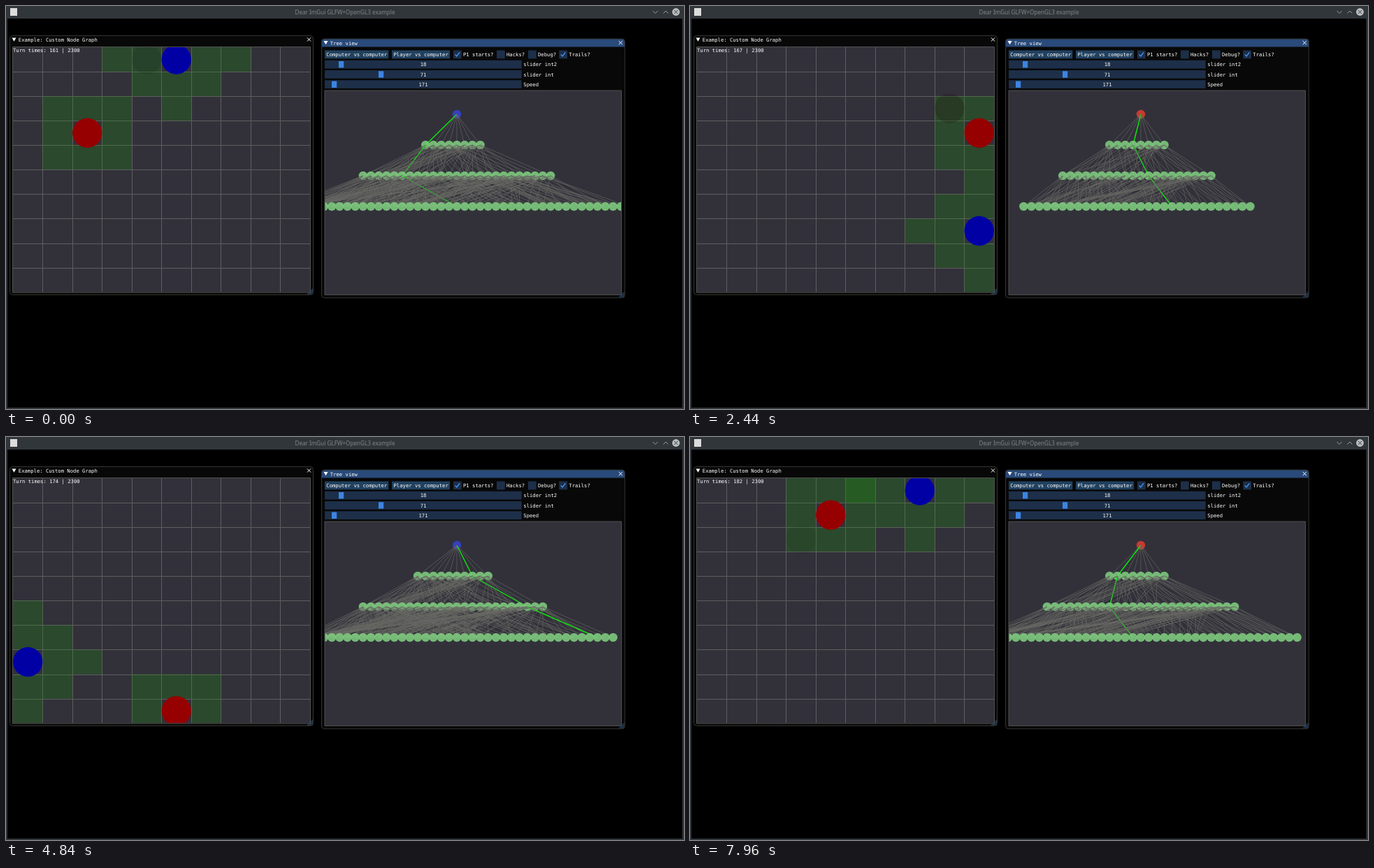
Recreate the animation shown at these times as an HTML page with a canvas. Size 970 by 577 pixels, loop 8 s.

```html
<!DOCTYPE html>
<html lang="en">
<head>
<meta charset="utf-8">
<title>Node graph</title>
<style>
html, body { margin: 0; width: 100%; height: 100%; overflow: hidden; background: #000; }
canvas { display: block; }
</style>
</head>
<body>
<canvas id="stage" width="970" height="577"></canvas>
<script>
const ctx = document.getElementById('stage').getContext('2d');
const LOOP = 8000, STEP = 40, SIZE = 10, LAP = 20;
const MONO = '7.22px "DejaVu Sans Mono", monospace';
const BOARD = { x: 10, y: 59, w: 425, h: 350.7 };
const TREE = { x: 456, y: 121, w: 424.5, h: 292.5 };
const CELL_W = BOARD.w / SIZE, CELL_H = BOARD.h / SIZE;
const ROW_H = 11.8, ROW_PITCH = 14.27, ROW_TOP = 63.5;
const PANEL = '#32313a', FRAME = '#1d2f49', EDGE = '#5e5e5e';

// Clockwise from north, then the straight double steps.
const KING = [[0, -1], [1, -1], [1, 0], [1, 1], [0, 1], [-1, 1], [-1, 0], [-1, -1]];
const DIAMOND = [...KING, [0, -2], [2, 0], [0, 2], [-2, 0]];

// One side of the blue lap; the other three are quarter turns of it.
const BLUE_SIDE = [[5, 0], [7, 0], [8, 1], [9, 2], [9, 4]];
const RED_LAP = [[2, 3], [3, 2], [4, 1], [5, 0], [6, 0], [7, 1], [8, 2], [9, 3], [9, 4], [9, 5],
  [8, 6], [7, 7], [6, 8], [5, 9], [4, 9], [3, 8], [2, 7], [1, 6], [1, 5], [1, 4]];

// Time in ms against turns played.
const PACE = [[0, 0.45], [1120, 3.32], [2440, 6.9], [3600, 10.06], [4840, 13.49], [5800, 16.06], [7960, 21.98]];

const wrap = n => ((n % LAP) + LAP) % LAP;
const turn90 = ([x, y]) => [9 - y, x];
const onBoard = ([x, y]) => x >= 0 && y >= 0 && x < SIZE && y < SIZE;
const repeatStep = ([ax, ay], [bx, by]) => [2 * bx - ax, 2 * by - ay];

function blueAt(n) {
  n = wrap(n);
  let p = BLUE_SIDE[n % 5];
  for (let q = Math.floor(n / 5); q > 0; q--) p = turn90(p);
  return p;
}
const redAt = n => RED_LAP[wrap(n)];

// Blue plans to run straight on, into the corner if need be.
function bluePlan(n) {
  const from = blueAt(n - 1), to = blueAt(n);
  const cornerNext = wrap(n + 1) % 5 === 2;
  const second = cornerNext ? repeatStep(from, to) : blueAt(n + 1);
  const third = repeatStep(to, second);
  const plan = [from, to, second];
  if (onBoard(third)) plan.push(third);
  else if (!cornerNext) plan.push(blueAt(n + 2));
  return plan;
}
const redPlan = n => [-1, 0, 1, 2].map(i => redAt(n + i));

const BLUE = { moves: DIAMOND, at: blueAt, plan: bluePlan, rgb: [0, 0, 165], root: '#3440bc' };
const RED = { moves: KING, at: redAt, plan: redPlan, rgb: [150, 0, 0], root: '#c83a30' };

function turnsAt(t) {
  let i = 1;
  while (i < PACE.length - 1 && t > PACE[i][0]) i++;
  const [t0, u0] = PACE[i - 1], [t1, u1] = PACE[i];
  return u0 + (u1 - u0) * (t - t0) / (t1 - t0);
}

const key = ([x, y]) => y * SIZE + x;
const reach = ([x, y], moves) => moves.map(([dx, dy]) => [x + dx, y + dy]).filter(onBoard);

function box(x, y, w, h, fill, stroke, r = 0) {
  ctx.beginPath();
  ctx.roundRect(x, y, w, h, r);
  if (fill) { ctx.fillStyle = fill; ctx.fill(); }
  if (stroke) { ctx.strokeStyle = stroke; ctx.lineWidth = 1; ctx.stroke(); }
}

function line(points, color, width = 1) {
  ctx.beginPath();
  points.forEach(([x, y]) => ctx.lineTo(x, y));
  ctx.strokeStyle = color;
  ctx.lineWidth = width;
  ctx.stroke();
}

function disc(x, y, r, fill) {
  ctx.beginPath();
  ctx.arc(x, y, r, 0, Math.PI * 2);
  ctx.fillStyle = fill;
  ctx.fill();
}

function poly(points, fill) {
  ctx.beginPath();
  points.forEach(([x, y]) => ctx.lineTo(x, y));
  ctx.fillStyle = fill;
  ctx.fill();
}

function text(s, x, midY, align = 'left', color = '#fff', font = MONO) {
  ctx.font = font;
  ctx.textAlign = align;
  ctx.fillStyle = color;
  ctx.fillText(s, x, midY + 2.6);
}

function cross(x, y, r, color) {
  line([[x - r, y - r], [x + r, y + r]], color);
  line([[x - r, y + r], [x + r, y - r]], color);
}

function clipTo(area, draw) {
  ctx.save();
  ctx.beginPath();
  ctx.rect(area.x, area.y, area.w, area.h);
  ctx.clip();
  draw();
  ctx.restore();
}

function drawDesktop() {
  box(0, 0, 970, 577, '#31363b');
  box(2, 18, 965.5, 557, '#000');
  box(6, 3, 10, 11, '#dcdcdc');
  text('Dear ImGui GLFW+OpenGL3 example', 485, 9, 'center', '#7f8488', '8.13px "Noto Sans", sans-serif');
  line([[925.5, 7], [929, 10.5], [932.5, 7]], '#989c9f');
  line([[940.5, 10.5], [944, 7], [947.5, 10.5]], '#989c9f');
  disc(958.5, 8.5, 5.4, '#b9bcbe');
  cross(958.5, 8.5, 2.4, '#31363b');
}

function drawWindow(x, y, w, h, title, bar) {
  box(x + 0.5, y + 0.5, w - 1, h - 1, '#080808', null, 4);
  box(x + 0.5, y + 0.5, w - 1, ROW_H - 0.5, bar, null, [4, 4, 0, 0]);
  poly([[x + w - 10, y + h - 1], [x + w - 1, y + h - 10], [x + w - 1, y + h - 1]], '#1c3148');
  box(x + 0.5, y + 0.5, w - 1, h - 1, null, '#34342f', 4);
  const mid = y + 6;
  poly([[x + 3.5, mid - 2.5], [x + 9.5, mid - 2.5], [x + 6.5, mid + 2.7]], '#fff');
  text(title, x + 12.8, mid + 0.3);
  cross(x + w - 6.5, mid, 2.6, '#fff');
}

function drawControls() {
  const mid = ROW_TOP + ROW_H / 2;
  box(456, ROW_TOP, 91.3, ROW_H, '#21415f');
  box(552, ROW_TOP, 83, ROW_H, '#21415f');
  text('Computer vs computer', 458.3, mid);
  text('Player vs computer', 554.5, mid);
  [[640, 'P1 starts?', 1], [702, 'Hacks?', 0], [747, 'Debug?', 0], [791.3, 'Trails?', 1]].forEach(([x, label, on]) => {
    box(x, ROW_TOP, ROW_H, ROW_H, FRAME);
    if (on) line([[x + 2.5, mid], [x + 4.8, mid + 2.5], [x + 9, mid - 3]], '#4296fa', 1.4);
    text(label, x + 14, mid);
  });
  [['slider int2', 18, 476], ['slider int', 71, 533], ['Speed', 171, 466]].forEach(([label, value, x], i) => {
    const y = ROW_TOP + (i + 1) * ROW_PITCH;
    box(456, y, 281.7, ROW_H, FRAME);
    box(x, y + 1.2, 7.2, ROW_H - 2.4, '#3d85e0');
    text(value, 597, y + ROW_H / 2, 'center');
    text(label, 740.3, y + ROW_H / 2);
  });
}

function drawPiece([x, y], rgb, strength = 1) {
  const shade = rgb.map(v => Math.round(v * strength)).join();
  disc(BOARD.x + (x + 0.5) * CELL_W, BOARD.y + (y + 0.5) * CELL_H, 21.2, `rgba(${shade},${strength})`);
}

function drawBoard(state) {
  const { x, y, w, h } = BOARD;
  box(x, y, w, h, PANEL);
  clipTo(BOARD, () => {
    for (let i = 1; i < SIZE; i++) {
      const gx = Math.floor(x + i * CELL_W) + 0.5, gy = Math.round(y + i * CELL_H) + 0.5;
      line([[gx, y], [gx, y + h]], EDGE);
      line([[x, gy], [x + w, gy]], EDGE);
    }
    for (const [side, n] of [[RED, state.red], [BLUE, state.blue]]) {
      for (const [cx, cy] of reach(side.at(n), side.moves)) {
        box(x + cx * CELL_W, y + cy * CELL_H, CELL_W, CELL_H, 'rgba(20,160,0,0.22)');
      }
    }
    drawPiece(state.mover.at(state.n - 1), state.mover.rgb, state.trail);
    drawPiece(redAt(state.red), RED.rgb);
    drawPiece(blueAt(state.blue), BLUE.rgb);
  });
  box(x - 0.5, y - 0.5, w + 1, h + 1, null, '#505050');
  text(`Turn times: ${161 + state.blue} | 2300`, 10, 63.6);
}

// Each level holds every cell within reach, in the order it was found.
function buildLevels(start, moves) {
  const levels = [[start]];
  for (let d = 0; d < 3; d++) {
    const seen = new Map();
    for (const cell of levels[d]) {
      for (const next of reach(cell, moves)) {
        if (!seen.has(key(next))) seen.set(key(next), next);
      }
    }
    levels.push([...seen.values()]);
  }
  return levels;
}

function drawTree({ mover, n }) {
  const plan = mover.plan(n).map(key);
  const levels = buildLevels(mover.at(n - 1), mover.moves);
  const place = (d, i) => [645 + (i - Math.floor(levels[d].length / 2)) * 11.18, 155 + d * 44];

  function drawEdges(d) {
    const index = new Map(levels[d + 1].map((cell, i) => [key(cell), i]));
    levels[d].forEach((cell, i) => {
      for (const next of reach(cell, mover.moves)) {
        const chosen = key(cell) === plan[d] && key(next) === plan[d + 1];
        line([place(d, i), place(d + 1, index.get(key(next)))],
          chosen ? '#0aee0a' : 'rgba(106,106,101,0.65)', chosen ? 1.4 : 0.95);
      }
    });
  }

  box(TREE.x, TREE.y, TREE.w, TREE.h, PANEL);
  clipTo(TREE, () => levels.forEach((cells, d) => {
    // Edges leaving a level lie over its own nodes.
    cells.forEach((_, i) => disc(...place(d, i), 6.2, d ? 'rgba(128,206,128,0.87)' : mover.root));
    if (d < 3) drawEdges(d);
  }));
  box(TREE.x, TREE.y, TREE.w, TREE.h, null, '#505050');
}

function render(t) {
  const turns = turnsAt(t);
  const half = Math.floor(turns * 2);
  const blue = Math.floor(turns);
  const red = blue + half % 2;
  const mover = half % 2 ? RED : BLUE;
  const state = { blue, red, mover, n: half % 2 ? red : blue, trail: 1 - (turns * 2 - half) };
  drawDesktop();
  drawWindow(5, 42, 435, 372, 'Example: Custom Node Graph', '#080808');
  drawBoard(state);
  drawWindow(451, 46.6, 434.8, 371.7, 'Tree view', '#294a7a');
  drawControls();
  drawTree(state);
}

const began = performance.now();
function tick() {
  const t = (performance.now() - began) % LOOP;
  render(Math.floor(t / STEP) * STEP);
  requestAnimationFrame(tick);
}
tick();
</script>
</body>
</html>
```
